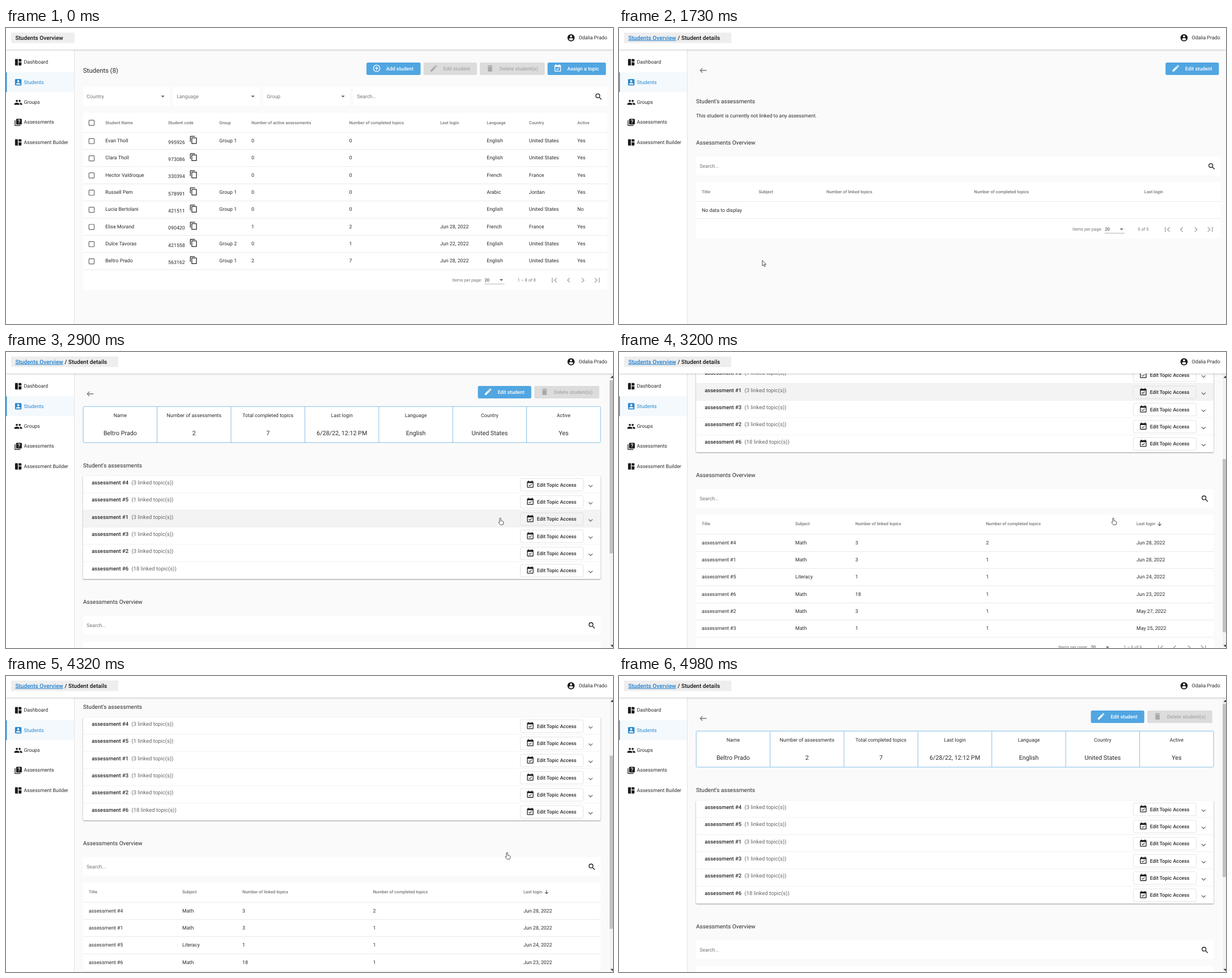
Animation, 1071 px wide and 523 px high, one loop 5.51 s. Source, as an HTML page:

```html
<!DOCTYPE html>
<html lang="en">
<head>
<meta charset="utf-8">
<title>Students Overview</title>
<style>
  html, body { margin: 0; width: 100%; height: 100%; overflow: hidden; background: #fafafa; }
  svg { display: block; }
  text { font-family: Roboto, Arial, sans-serif; white-space: pre; text-rendering: geometricPrecision; }
  .bar { filter: drop-shadow(0 1px 1.5px rgba(0, 0, 0, .22)); }
  .panel { filter: drop-shadow(0 1px 1px rgba(0, 0, 0, .4)); }
</style>
</head>
<body>
<svg id="stage" width="1071" height="523" viewBox="0 0 1071 523"></svg>
<script>
const LOOP = 5510;
const UNIT = 0.632;            // the interface is shown at this zoom
const ROW = 48 * UNIT;
const INK = '#2b2b2b', DARK = '#1c1c1c', GREY = '#757575', BLUE = '#2c87c9', LINE = '#e0e0e0';

const ICONS = {
  board: 'M3 5a2 2 0 0 1 2-2h6v18H5a2 2 0 0 1-2-2zM13 3h6a2 2 0 0 1 2 2v5h-8zM13 12h8v7a2 2 0 0 1-2 2h-6z',
  person: 'M3 5v14a2 2 0 0 0 2 2h14c1.1 0 2-.9 2-2V5a2 2 0 0 0-2-2H5a2 2 0 0 0-2 2zm12 4c0 1.66-1.34 3-3 3s-3-1.34-3-3 1.34-3 3-3 3 1.34 3 3zm-9 8c0-2 4-3.1 6-3.1s6 1.1 6 3.1v1H6v-1z',
  group: 'M16 11c1.66 0 3-1.34 3-3s-1.34-3-3-3-3 1.34-3 3 1.34 3 3 3zm-8 0c1.66 0 3-1.34 3-3S9.66 5 8 5 5 6.34 5 8s1.34 3 3 3zm0 2c-2.33 0-7 1.17-7 3.5V19h14v-2.5c0-2.33-4.67-3.5-7-3.5zm8 0c-.29 0-.62.02-.97.05 1.16.84 1.97 1.97 1.97 3.45V19h6v-2.5c0-2.33-4.67-3.5-7-3.5z',
  quiz: 'M4 6H2v14c0 1.1.9 2 2 2h14v-2H4V6zM20 2H8a2 2 0 0 0-2 2v12a2 2 0 0 0 2 2h12a2 2 0 0 0 2-2V4a2 2 0 0 0-2-2z',
  account: 'M12 2C6.48 2 2 6.48 2 12s4.48 10 10 10 10-4.48 10-10S17.52 2 12 2zm0 3c1.66 0 3 1.34 3 3s-1.34 3-3 3-3-1.34-3-3 1.34-3 3-3zm0 14.2c-2.5 0-4.71-1.28-6-3.22.03-1.99 4-3.08 6-3.08 1.99 0 5.97 1.09 6 3.08-1.29 1.94-3.5 3.22-6 3.22z',
  add: 'M13 7h-2v4H7v2h4v4h2v-4h4v-2h-4V7zm-1-5C6.48 2 2 6.48 2 12s4.48 10 10 10 10-4.48 10-10S17.52 2 12 2zm0 18c-4.41 0-8-3.59-8-8s3.59-8 8-8 8 3.59 8 8-3.59 8-8 8z',
  edit: 'M3 17.25V21h3.75L17.81 9.94l-3.75-3.75L3 17.25zM20.71 7.04a1 1 0 0 0 0-1.41l-2.34-2.34a1 1 0 0 0-1.41 0l-1.83 1.83 3.75 3.75 1.83-1.83z',
  bin: 'M6 19c0 1.1.9 2 2 2h8c1.1 0 2-.9 2-2V7H6v12zM19 4h-3.5l-1-1h-5l-1 1H5v2h14V4z',
  date: 'M16.53 11.06L15.47 10l-4.88 4.88-2.12-2.12-1.06 1.06L10.59 17l5.94-5.94zM19 3h-1V1h-2v2H8V1H6v2H5a2 2 0 0 0-2 2v14a2 2 0 0 0 2 2h14a2 2 0 0 0 2-2V5a2 2 0 0 0-2-2zm0 16H5V8h14v11z',
  copy: 'M16 1H4c-1.1 0-2 .9-2 2v14h2V3h12V1zm3 4H8c-1.1 0-2 .9-2 2v14c0 1.1.9 2 2 2h11c1.1 0 2-.9 2-2V7c0-1.1-.9-2-2-2zm0 16H8V7h11v14z',
  search: 'M15.5 14h-.79l-.28-.27A6.47 6.47 0 0 0 16 9.5 6.5 6.5 0 1 0 9.5 16c1.61 0 3.09-.59 4.23-1.57l.27.28v.79l5 4.99L20.49 19l-4.99-5zm-6 0C7.01 14 5 11.99 5 9.5S7.01 5 9.5 5 14 7.01 14 9.5 11.99 14 9.5 14z',
  back: 'M9 19l1.41-1.41L5.83 13H21v-2H5.83l4.59-4.59L9 5l-7 7 7 7z',
  first: 'M18.41 16.59L13.82 12l4.59-4.59L17 6l-6 6 6 6zM6 6h2v12H6z',
  prev: 'M15.41 7.41L14 6l-6 6 6 6 1.41-1.41L10.83 12z',
  next: 'M10 6L8.59 7.41 13.17 12l-4.58 4.59L10 18l6-6z',
  last: 'M5.59 7.41L10.18 12l-4.59 4.59L7 18l6-6-6-6zM16 6h2v12h-2z',
  expand: 'M16.59 8.59L12 13.17 7.41 8.59 6 10l6 6 6-6z',
  drop: 'M7 10l5 5 5-5z',
  sort: 'M11 6h2v9.2l3.6-3.6L18 13l-6 6-6-6 1.4-1.4 3.6 3.6z'
};

// Drawing helpers: y is the vertical middle of text and icons, size is in unzoomed pixels.
const text = (x, y, s, { size = 14, weight = 400, fill = INK, mid = false, extra = '' } = {}) =>
  `<text x="${x}" y="${y + size * UNIT * .355}" font-size="${size * UNIT}" font-weight="${weight}" fill="${fill}"${mid ? ' text-anchor="middle"' : ''} ${extra}>${s}</text>`;
const rect = (x, y, w, h, fill = '#fff', extra = '') =>
  `<rect x="${x}" y="${y}" width="${w}" height="${h}" fill="${fill}" ${extra}/>`;
const rule = (y, x1, x2, color = LINE) => rect(x1, y - .35, x2 - x1, .7, color);
const icon = (name, x, y, fill = DARK, k = UNIT) =>
  `<path d="${ICONS[name]}" fill="${fill}" transform="translate(${x - 12 * k} ${y - 12 * k}) scale(${k})"/>`;
const heading = (y, s) => text(136, y, s, { size: 16 });

function button(x, w, name, label, on = true, y = 61) {
  const ink = on ? '#fff' : '#a9a9a9';
  return rect(x, y, w, 22, on ? '#51a6e1' : '#dcdcdc', 'rx="2.5"') +
    icon(name, x + 18, y + 10.3, ink) + text(x + 34.8, y + 10.6, label, { weight: 500, fill: ink });
}

function searchBox(x, right, y) {
  return rect(x, y - 16.5, right - x, 33) + text(x + 6.3, y, 'Search...', { fill: GREY }) +
    icon('search', right - 15.2, y + .8);
}

function pager(y, right, range, shift = 0) {
  const x = right - 1061 + shift, ends = right - 1061;
  const names = ['first', 'prev', 'next', 'last'];
  return text(787.3 + x, y, 'Items per page:', { size: 12, fill: GREY }) +
    text(844.6 + x, y, '20', { size: 12 }) + icon('drop', 874 + x, y, '#666') +
    rule(y + 7.2, 844 + x, 879.5 + x, '#949494') +
    text(902.5 + x, y, range, { size: 12, fill: GREY }) +
    names.map((n, i) => icon(n, 967.5 + 25.2 * i + ends, y + .6, '#a8a8a8', UNIT * 28 / 24)).join('');
}

const tableHead = (xs, names, y) =>
  names.map((n, i) => text(xs[i], y, n, { size: 12, weight: 500, fill: GREY })).join('');

function checkbox(y) {
  return rect(146.4, y - 4.6, 9.2, 9.2, 'none', 'stroke="#666" stroke-width="1.2" rx="1"');
}

function listPage() {
  const xs = [175.3, 286, 376.3, 433, 605.4, 766, 848.2, 922.8, 1008];
  const heads = ['Student Name', 'Student code', 'Group', 'Number of active assessments',
    'Number of completed topics', 'Last login', 'Language', 'Country', 'Active'];
  const us = 'English|United States|Yes';
  const rows = [
    'Evan Tholl|995926|Group 1|0|0||' + us,
    'Clara Tholl|973086||0|0||' + us,
    'Hector Valdroque|330394||0|0||French|France|Yes',
    'Russell Pem|578991|Group 1|0|0||Arabic|Jordan|Yes',
    'Lucia Bertolani|421511|Group 1|0|0||English|United States|No',
    'Elise Morand|090420||1|2|Jun 28, 2022|French|France|Yes',
    'Dulce Tavoras|421558|Group 2|0|1|Jun 22, 2022|' + us,
    'Beltro Prado|563162|Group 1|2|7|Jun 28, 2022|' + us
  ];
  let out = text(136, 75, 'Students (8)', { size: 18 }) +
    button(636, 95.5, 'add', 'Add student') + button(736.7, 94.2, 'edit', 'Edit student', false) +
    button(836, 114.5, 'bin', 'Delete student(s)', false) + button(955.5, 103, 'date', 'Assign a topic');
  ['Country', 'Language', 'Group'].forEach((name, i) => {
    const x = 136 + 159 * i;
    out += rect(x, 104, 152.7, 33) + text(x + 6.3, 121, name, { fill: GREY }) + icon('drop', x + 140.6, 120.8, '#666');
  });
  out += searchBox(613, 1061, 120.7) + rect(136, 150, 925, 312) + checkbox(167.5) +
    tableHead(xs, heads, 167) + rule(184.3, 136, 1061);
  rows.forEach((row, r) => {
    const y = 199 + ROW * r;
    out += checkbox(y + .9) + icon('copy', 331, y - 1.2, '#222') + rule(184.3 + ROW * (r + 1), 136, 1061);
    row.split('|').forEach((cell, i) => out += text(xs[i], i == 1 ? y + 2.4 : y, cell));
  });
  return out + pager(445, 1061, '1 – 8 of 8');
}

function emptyPage() {
  return icon('back', 148.7, 75, GREY) + button(964.3, 94.2, 'edit', 'Edit student') +
    heading(129.5, "Student's assessments") +
    text(136, 155.2, 'This student is currently not linked to any assessment.') +
    heading(202.5, 'Assessments Overview') + searchBox(136, 1061, 243.8) + rect(136, 272, 925, 100) +
    tableHead([146, 246.5, 366, 626.6, 926.8],
      ['Title', 'Subject', 'Number of linked topics', 'Number of completed topics', 'Last login'], 289.2) +
    rule(306.5, 136, 1061) + text(146, 321.4, 'No data to display') + rule(336.8, 136, 1061) +
    pager(355.4, 1061, '0 of 0', 12.8);
}

const PANEL_TOP = 219.6;

function detailPage() {
  const facts = [['Name', 'Beltro Prado'], ['Number of assessments', '2'], ['Total completed topics', '7'],
    ['Last login', '6/28/22, 12:12 PM'], ['Language', 'English'], ['Country', 'United States'], ['Active', 'Yes']];
  const linked = [[4, 3], [5, 1], [1, 3], [3, 1], [2, 3], [6, 18]];
  const results = ['4|Math|3|2|Jun 28, 2022', '1|Math|3|1|Jun 28, 2022', '5|Literacy|1|1|Jun 24, 2022',
    '6|Math|18|1|Jun 23, 2022', '2|Math|3|1|May 27, 2022', '3|Math|1|1|May 25, 2022'];
  const right = 1049, cell = 130.4;

  let out = icon('back', 148.7, 75, GREY) + button(832.6, 94.2, 'edit', 'Edit student') +
    button(932.2, 114.6, 'bin', 'Delete student(s)', false) +
    rect(136.2, 97.3, 912.8, 63.7, '#fff', 'stroke="#84c0e8" stroke-width="1" rx="1.5"');
  facts.forEach(([label, value], i) => {
    const x = 136.2 + cell * i;
    if (i) out += rect(x - .5, 97.3, 1, 63.7, '#84c0e8');
    out += text(x + cell / 2, 113.2, label, { mid: true }) + text(x + cell / 2, 144.5, value, { size: 17, mid: true });
  });

  out += heading(201.5, "Student's assessments") +
    rect(136, PANEL_TOP + .4, 913, ROW * 6, '#fff', 'class="panel" rx="2"') +
    rect(136, 0, 913, ROW, '#f3f3f3', 'id="hover"');
  linked.forEach(([id, count], i) => {
    const y = 231.5 + ROW * i;
    if (i) out += rule(PANEL_TOP + ROW * i, 136, right, '#ececec');
    out += text(151.2, y, 'assessment #' + id, { size: 15, weight: 500 }) +
      text(221.5, y, `(${count} linked topic(s))`, { size: 15, fill: '#666' }) +
      rect(907.5, y - 7, 111, 22.2, 'none', 'stroke="#dedede" stroke-width=".8" rx="2.5"') +
      icon('date', 925, y + 3.6) + text(936.8, y + 4, 'Edit Topic Access', { weight: 500 }) +
      icon('expand', 1031.5, y + 6.3, '#666');
  });

  const xs = [146, 311, 417, 647.4, 913];
  out += heading(442.5, 'Assessments Overview') + searchBox(136, right, 483.5) +
    rect(136, 512.5, 913, 252) +
    tableHead(xs, ['Title', 'Subject', 'Number of linked topics', 'Number of completed topics', 'Last login'], 528.7) +
    icon('sort', 953.8, 528.6, '#555', .55) + rule(547, 136, right);
  results.forEach((row, r) => {
    row.split('|').forEach((value, i) =>
      out += text(xs[i], 561.5 + ROW * r, i ? value : 'assessment #' + value));
    out += rule(547 + ROW * (r + 1), 136, right);
  });
  return out + pager(746.8, right, '1 – 6 of 6');
}

function sidebar() {
  const items = [['board', 'Dashboard'], ['person', 'Students'], ['group', 'Groups'],
    ['quiz', 'Assessments'], ['board', 'Assessment Builder']];
  let out = rect(0, 38, 120, 485) + rect(120, 38, .8, 485, '#dedede') +
    rect(0, 78.3, 120, 35, '#f3f9fd') + rect(0, 78.3, 1.4, 35, BLUE);
  items.forEach(([name, label], i) => {
    const y = 60 + 35.4 * i, fill = i == 1 ? BLUE : DARK;
    out += icon(name, 21.6, y + .5, fill) + text(31.5, y, label, { fill: i == 1 ? BLUE : INK });
  });
  return out + '<path d="M11.5 7.5a2.5 2.5 0 1 1 3.6 2.2c-.8.5-1.1 1-1.1 2M14 13.3v1.8" fill="none" stroke="#fff" stroke-width="1.8" transform="translate(14 159.1) scale(.632)"/>';
}

function topBar() {
  const bold = { size: 16, weight: 500, fill: '#111' };
  const link = { ...bold, fill: '#1f7fd0', extra: 'text-decoration="underline"' };
  return rect(0, -5, 1071, 43, '#fff', 'class="bar"') +
    `<g id="crumb-list">${rect(9, 8, 112, 18.6, '#eee') + text(16.4, 17, 'Students Overview', bold)}</g>` +
    `<g id="crumb-detail">${rect(9, 8, 189, 18.6, '#eee') + text(16.4, 17, 'Students Overview', link) +
      text(103.6, 17, '/ Student details', bold)}</g>` +
    icon('account', 997, 17.3) + text(1010.4, 17.2, 'Odalia Prado');
}

const scrollbar = rect(1065, 38, 6, 485, '#f3f3f3') + rect(1065, 0, 6, 306, '#c3c3c3', 'id="thumb"') +
  '<path d="M1066.5 46l3.5-4 3.5 4zM1066.5 517.5l3.5 4 3.5-4z" fill="#444"/>';
const pointers = '<g id="cursor" stroke="#222" stroke-width=".8" fill="#fff" stroke-linejoin="round">' +
  '<path id="arrow" d="M.4.4v9.8l2.2-2 1.5 3.3 1.5-.7-1.4-3.2h3z"/>' +
  '<path id="hand" d="M0 .3c.8 0 1.2.5 1.2 1.1v3.8l3.4.9c1 .3 1.4.9 1.3 1.9l-.5 3c-.1.9-.6 1.3-1.4 1.3H1c-.7 0-1.2-.3-1.6-.9L-2.7 8.4c-.5-.8.5-1.5 1.2-.9l.4.4V1.4C-1.1.8-.7.3 0 .3z"/></g>';

document.getElementById('stage').innerHTML = rect(0, 0, 1071, 523, '#fafafa') +
  `<g id="list">${listPage()}</g><g id="empty">${emptyPage()}</g>` +
  `<g id="detail"><g id="content">${detailPage()}</g>${scrollbar}</g>` +
  sidebar() + topBar() + pointers;

// Timelines hold each value until the next step.
const spread = (t0, t1, values) =>
  values.map((v, i) => [Math.round(t0 + (t1 - t0) * i / (values.length - 1)), v]);
const glide = (t0, t1, n, a, b, ease = p => p) =>
  spread(t0, t1, Array.from({ length: n }, (_, i) => a.map((v, k) => v + (b[k] - v) * ease((i + 1) / n))));
const smooth = p => p * p * (3 - 2 * p);
const valueAt = (steps, t) => steps.reduce((found, [start, v]) => start <= t ? v : found, null);

const SHOW_DETAIL = 1390, LOADED = 1790;
const pointerSteps = [
  [70, [885, 496]], [120, [700, 473]], [180, [529, 474]],
  ...glide(600, 1120, 9, [529, 474], [249, 421], smooth),
  [1190, [250, 416]], [1250, [252.5, 410]],
  [2050, [600, 325]], [2180, [866, 268]],
  ...glide(2380, 2830, 8, [866, 268], [872, 293], smooth),
  ...glide(3590, 3720, 3, [872, 293], [879, 306]),
  ...glide(4118, 4590, 8, [879, 306], [889, 317]),
  [4915, null]
];
const scrollSteps = [
  [0, 0], [2900, 1],
  ...spread(2970, 3520, [38, 105, 172, 225, 240, 247, 251, 253, 253.5]),
  ...spread(4050, 4590, [252.5, 243, 218, 183, 147, 115, 88, 66, 46.5]),
  ...spread(4660, 4980, [30, 18, 9, 4, 1, 0])
];

const el = id => document.getElementById(id);
const show = (id, on) => el(id).setAttribute('visibility', on ? 'visible' : 'hidden');

function draw(t) {
  const onList = t < SHOW_DETAIL, loaded = t >= LOADED;
  const scroll = valueAt(scrollSteps, t), at = valueAt(pointerSteps, t);
  el('list').style.display = onList ? '' : 'none';
  el('empty').style.display = !onList && !loaded ? '' : 'none';
  el('detail').style.display = loaded ? '' : 'none';
  show('crumb-list', onList);
  show('crumb-detail', !onList);
  el('content').setAttribute('transform', `translate(0 ${-scroll})`);
  el('thumb').setAttribute('y', 49.2 + scroll * .622);

  // The hovered row stays marked until the downward scroll settles.
  const hoverScroll = t < 3520 ? Math.min(scroll, 1) : scroll;
  const row = at && loaded ? Math.floor((at[1] + hoverScroll - PANEL_TOP) / ROW) : -1;
  el('hover').style.display = row >= 0 && row < 6 ? '' : 'none';
  el('hover').setAttribute('y', PANEL_TOP + ROW * row);

  const hand = at && (onList ? at[1] < 427 : t >= 2050);
  show('arrow', at && !hand);
  show('hand', hand);
  if (at) el('cursor').setAttribute('transform', `translate(${at[0]} ${at[1]})`);
}

const begin = performance.now();
function tick() {
  draw((performance.now() - begin) % LOOP);
  requestAnimationFrame(tick);
}
tick();
</script>
</body>
</html>
```
